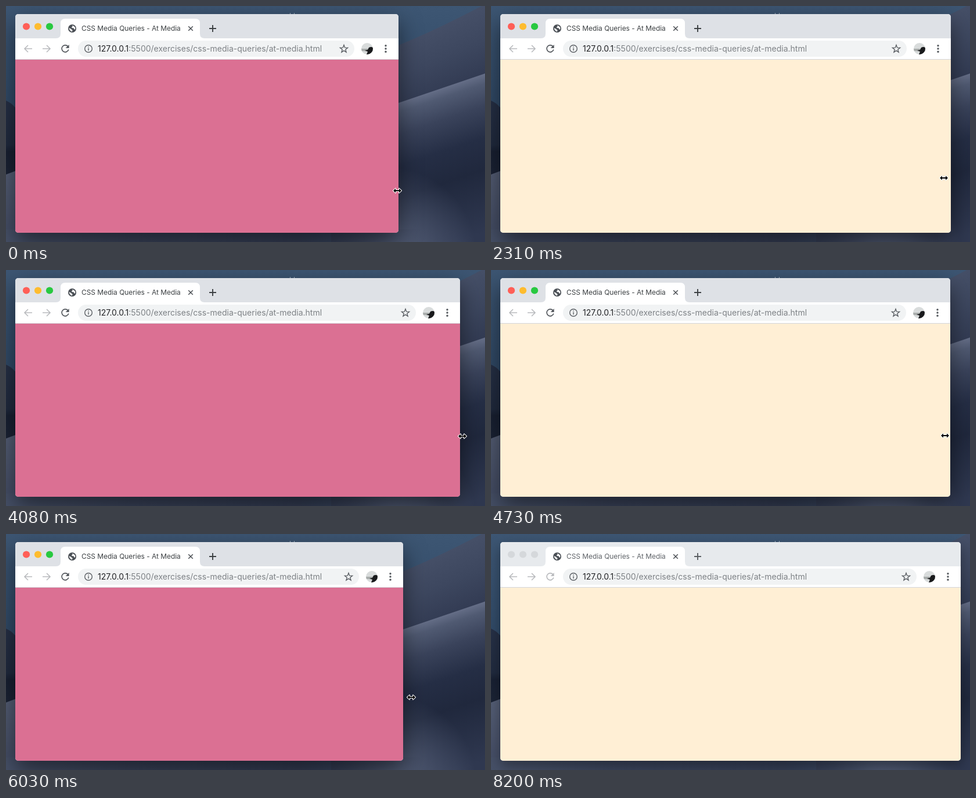
Recreate the animation shown at these times as an HTML page with a canvas. Size 825 px wide and 409 px high, loop 8300 ms.

```html
<!DOCTYPE html>
<html lang="en">
<head>
<meta charset="utf-8">
<title>Window resize</title>
<style>
  html, body { margin: 0; width: 100%; height: 100%; overflow: hidden; background: #252d40; }
  canvas { display: block; }
</style>
</head>
<body>
<canvas id="stage" width="825" height="409"></canvas>
<script>
const W = 825, H = 409, LOOP = 8300, STEP = 59;
const LEFT = 16, TOP = 14, BOTTOM = 393, BREAKPOINT = 768;
const ctx = document.getElementById('stage').getContext('2d');

const easeOut = p => u => 1 - (1 - u) ** p;
const easeIn = p => u => u ** p;

// Pointer drags, each starting where the one before it ended.
const home = { x: 674, y: 320 };
const drags = [
  { from: 720, to: 1890, x: 811, y: 298, ease: easeOut(2.47) },
  { from: 2190, to: 3140, x: 658, y: 300, ease: easeOut(1.1) },
  { from: 3440, to: 4370, x: 802, y: 286, ease: easeOut(1.6) },
  { from: 4550, to: 5500, x: 629, y: 291, ease: easeIn(1.55) },
  { from: 5860, to: 6740, x: 807, y: 271, ease: easeOut(1.58) }
];
const exit = { from: 7340, to: 8000, x: 823, y: 425, ease: easeIn(1.2) };

const stepCount = m => Math.round((m.to - m.from) / STEP);

function stepAt(m, t) {
  const n = stepCount(m);
  return t < m.from ? -1 : Math.min(n, Math.floor((t - m.from) / (m.to - m.from) * n + .15));
}

function glide(start, m, step) {
  const f = m.ease(Math.max(0, Math.min(1, (step + 1) / stepCount(m))));
  return {
    x: Math.round(start.x + (m.x - start.x) * f),
    y: Math.round(start.y + (m.y - start.y) * f)
  };
}

// The window edge trails the pointer by one step.
function pose(t) {
  const i = Math.max(0, drags.filter(d => t >= d.from).length - 1);
  const drag = drags[i], start = drags[i - 1] || home, step = stepAt(drag, t);
  const right = glide(start, drag, step - 1).x + 2;
  const pointer = t < exit.from ? glide(start, drag, step) : glide(drag, exit, stepAt(exit, t));
  return { right, ...pointer };
}

function mix(a, b, f) {
  return `rgb(${a.map((v, i) => Math.round(v + (b[i] - v) * f)).join()})`;
}

function fill(d, color, c = ctx) {
  c.fillStyle = color;
  c.fill(new Path2D(d));
}

function stroke(d, color, width) {
  ctx.strokeStyle = color;
  ctx.lineWidth = width;
  ctx.stroke(new Path2D(d));
}

function disc(x, y, r, color) {
  ctx.beginPath();
  ctx.arc(x, y, r, 0, Math.PI * 2);
  ctx.fillStyle = color;
  ctx.fill();
}

function box(x, y, w, h, r, color) {
  ctx.beginPath();
  ctx.roundRect(x, y, w, h, r);
  ctx.fillStyle = color;
  ctx.fill();
}

function at(x, y, draw) {
  ctx.save();
  ctx.translate(x, y);
  draw();
  ctx.restore();
}

function text(s, x, y, size, color) {
  ctx.font = `${size}px Inter, "Open Sans", sans-serif`;
  ctx.fillStyle = color;
  ctx.fillText(s, x, y);
  return ctx.measureText(s).width;
}

function paintDesert() {
  const pic = document.createElement('canvas');
  pic.width = W;
  pic.height = H;
  const c = pic.getContext('2d');
  const stops = (g, list) => {
    list.forEach(([p, color]) => g.addColorStop(p, color));
    return g;
  };
  const fade = (x0, y0, x1, y1, ...list) => stops(c.createLinearGradient(x0, y0, x1, y1), list);

  c.fillStyle = fade(0, 0, 0, 180, [0, '#3d5673'], [1, '#2f4865']);
  c.fillRect(0, 0, W, H);
  c.fillStyle = '#a9b7c6';
  for (const x of [490, 497]) c.fillRect(x - 1, 12, 1, 2);

  // left hills
  fill('M0 164Q8 167 16 176H400V409H0Z',
    fade(0, 165, 0, 290, [0, '#263046'], [.6, '#202a3e'], [.7, '#182032'], [1, '#1b2335']), c);
  fill('M0 292L16 286H400V409H0Z', fade(0, 288, 0, H, [0, '#545d74'], [1, '#414a62']), c);

  // right dunes
  fill('M560 108L676 68Q740 42 825 -3V409H560Z',
    fade(740, 38, 780, 133, [0, '#454f67'], [.5, '#3d475f'], [1, '#333c54']), c);
  fill('M560 205L676 168L825 117V409H560Z',
    fade(750, 143, 833, 390, [0, '#646d86'], [.06, '#505a72'], [.2, '#3a435b'], [.4, '#252e45'], [.6, '#20283d'], [1, '#2f3850']), c);
  c.fillStyle = stops(c.createRadialGradient(660, 430, 10, 660, 430, 150), [[0, '#566078'], [1, 'rgba(86,96,120,0)']]);
  c.fillRect(500, 270, 325, 139);

  c.fillStyle = fade(0, 0, 720, 0, [0, '#465067'], [.3, '#394259'], [.7, '#333c53'], [1, 'rgba(51,60,83,0)']);
  c.fillRect(0, BOTTOM - 6, 720, 22);
  return pic;
}
const desert = paintDesert();

function globe() {
  disc(0, 0, 7, '#4a4f55');
  fill('M-5.6-1L-2.4.6L.6 3L-.2 5.4Q-4 5-5.6-1Z', '#fff');
  fill('M-.4-5.5L.8-3.4L-1.4-2L.4-.8H2.6L3.4 1.4H5Q7-3-.4-5.5Z', '#fff');
}

function avatar() {
  ctx.beginPath();
  ctx.arc(0, 0, 10, 0, Math.PI * 2);
  ctx.clip();
  fill('M-10-10H10V10H-10Z', '#d9dcdc');
  fill('M-10 0H10V5L-10 4Z', '#a9adac');
  fill('M-4 3L1 2L3-2Q7-4 10-2V5L4 10H-1L1 5Z', '#191a1c');
}

function star(x) {
  ctx.beginPath();
  for (let i = 0; i < 10; i++) {
    const a = i * Math.PI / 5 - Math.PI / 2, r = i % 2 ? 2.9 : 6.9;
    ctx.lineTo(x + r * Math.cos(a), 74.5 + r * Math.sin(a));
  }
  ctx.closePath();
  ctx.strokeStyle = '#5b5f64';
  ctx.lineWidth = 1.4;
  ctx.stroke();
}

function drawTabs(right, idle) {
  ctx.fillStyle = mix([222, 225, 230], [231, 234, 237], idle);
  ctx.fillRect(LEFT, TOP, right - LEFT, 42);
  [[255, 95, 87], [254, 188, 46], [40, 201, 64]].forEach((color, i) => {
    disc(35 + i * 20, 35.5, 6.1, mix(color, [213, 216, 219], idle));
  });

  fill('M86 56Q94 56 94 48V30Q94 22 102 22H326Q334 22 334 30V48Q334 56 342 56Z', '#fff');
  at(114, 39, globe);
  text('CSS Media Queries - At Media', 130, 43, 11.9, mix([60, 64, 67], [95, 99, 104], idle));
  stroke('M314.2 35.2l7.6 7.6m0-7.6l-7.6 7.6', '#4a4e53', 1.5);
  stroke('M350 39h12M356 33v12', mix([60, 64, 67], [90, 94, 98], idle), 1.9);
}

function drawToolbar(right, idle) {
  ctx.fillStyle = '#fff';
  ctx.fillRect(LEFT, 56, right - LEFT, 36);
  ctx.fillStyle = '#d3d5d9';
  ctx.fillRect(LEFT, 92, right - LEFT, 1);

  stroke('M45 74H32.5M38 68l-6 6l6 6', '#b9bbbe', 1.6);
  stroke('M63 74H75.5M70 68l6 6l-6 6', '#b9bbbe', 1.6);
  const ink = mix([85, 89, 94], [185, 187, 190], idle);
  stroke('M107 70.4A6 6 0 1 0 107.8 75.6', ink, 1.7);
  fill('M108.6 67v6h-6Z', ink);

  box(124, 60, right - 200, 28, 14, '#f1f3f4');
  stroke('M148.3 74a6.3 6.3 0 1 0-12.6 0a6.3 6.3 0 1 0 12.6 0M142 73v4.2M142 70.2v1.6', '#5b5f64', 1.4);
  const w = text('127.0.0.1', 158, 79, 14, '#202124');
  text(':5500/exercises/css-media-queries/at-media.html', 158 + w, 79, 14, '#7d8185');
  star(right - 94);
  at(right - 54, 74, avatar);
  for (let i = -1; i <= 1; i++) disc(right - 22, 74 + i * 5.2, 1.7, '#55595e');
}

function drawWindow(right, idle) {
  const w = right - LEFT, h = BOTTOM - TOP;
  ctx.save();
  ctx.shadowColor = `rgba(0,0,0,${.5 - idle * .14})`;
  ctx.shadowBlur = 38 - idle * 16;
  ctx.shadowOffsetY = 14 - idle * 6;
  box(LEFT, TOP, w, h, 5, '#dee1e6');
  ctx.restore();

  ctx.save();
  ctx.beginPath();
  ctx.roundRect(LEFT, TOP, w, h, 5);
  ctx.clip();
  drawTabs(right, idle);
  drawToolbar(right, idle);
  ctx.fillStyle = w >= BREAKPOINT ? 'papayawhip' : 'palevioletred';
  ctx.fillRect(LEFT, 93, w, BOTTOM - 93);
  ctx.restore();
}

const resizeShape = 'M-7 0L-3-3.7V-1H3V-3.7L7 0L3 3.7V1H-3V3.7Z';
const arrowShape = 'M0 0V14L3.2 11L5.4 16L7.6 15L5.4 10.2H10Z';

function drawPointer({ x, y, right }, leaving) {
  const shape = leaving && x - right > 3 ? arrowShape : resizeShape;
  ctx.lineJoin = 'round';
  at(x, y, () => {
    stroke(shape, '#fff', 2);
    fill(shape, '#000');
  });
  ctx.lineJoin = 'miter';
}

function render(t) {
  const p = pose(t);
  const idle = t < 8160 ? 0 : t < 8200 ? .5 : 1;
  ctx.drawImage(desert, 0, 0);
  drawWindow(p.right, idle);
  if (t < exit.to) drawPointer(p, t >= exit.from);
}

const start = performance.now();
function tick() {
  render((performance.now() - start) % LOOP);
  requestAnimationFrame(tick);
}
tick();
</script>
</body>
</html>
```
